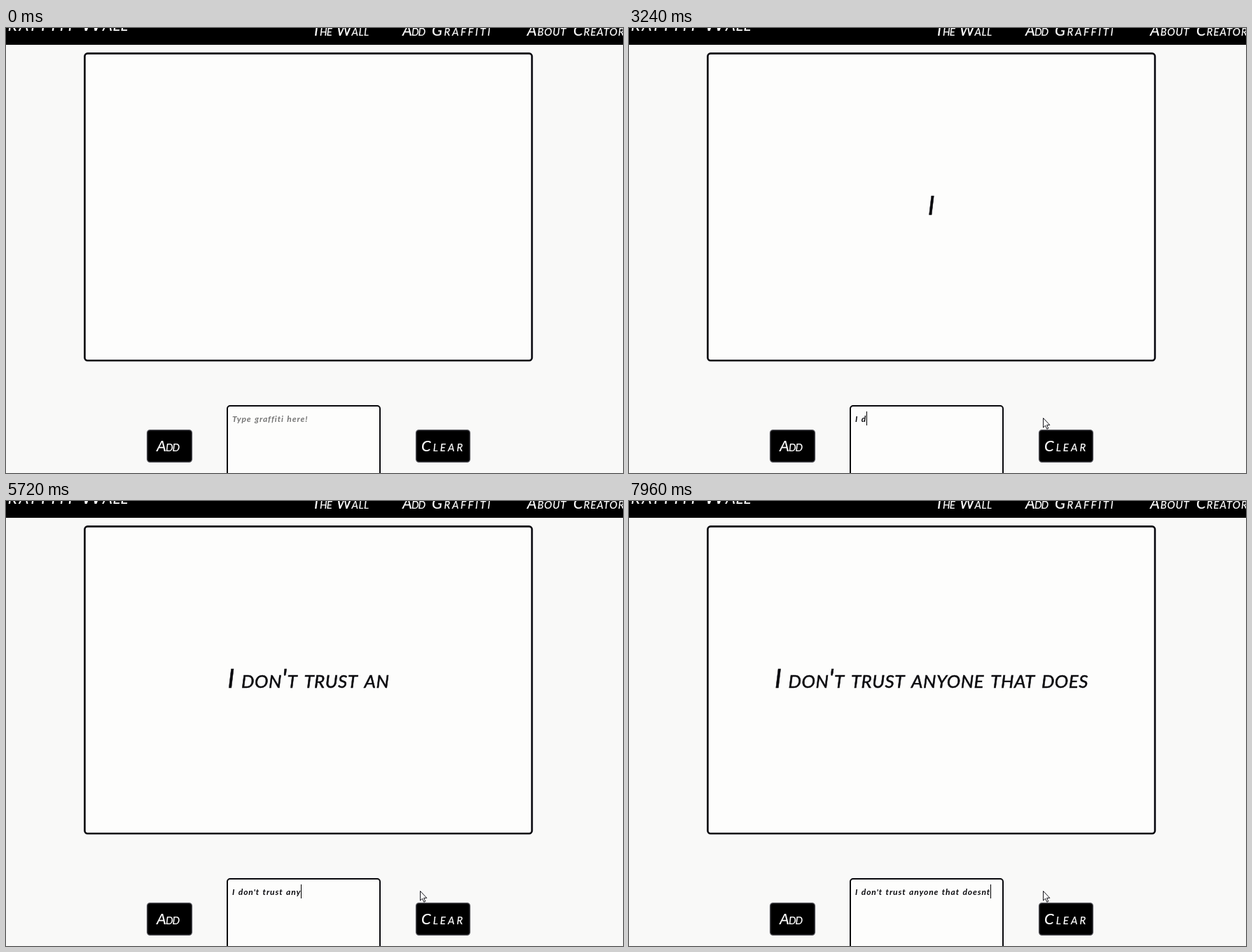
An HTML page that plays this animation: 881x636 px, repeating every 8000 ms.

```html
<!DOCTYPE html>
<html lang="en">
<head>
<meta charset="utf-8">
<title>Graffiti wall</title>
<style>
  html, body { margin: 0; width: 100%; height: 100%; overflow: hidden; background: #f9f9f8; }
  svg { display: block; }
  text { white-space: pre; font-family: Lato, "Open Sans", sans-serif; font-style: italic; }
  .caps { font-variant-caps: small-caps; font-size: 22px; fill: #fff; stroke: #fff; stroke-width: .2; }
  #wall { font-size: 37px; letter-spacing: .5px; text-anchor: middle; fill: #0a0a0e; stroke: #0a0a0e; stroke-width: .5; }
  #typed { font-size: 12px; font-weight: bold; letter-spacing: .9px; word-spacing: 1px; }
  .button { stroke: #45454b; stroke-width: 1.5; }
</style>
</head>
<body>
<svg width="881" height="636" viewBox="0 0 881 636">
  <rect width="881" height="24"/>
  <rect x="112.4" y="36.4" width="638.6" height="438.8" rx="4" fill="#fdfdfc" stroke="#05050c" stroke-width="2.6"/>
  <rect x="316" y="540" width="218" height="120" rx="4" fill="#fdfdfc" stroke="#08080c" stroke-width="2"/>
  <rect class="button" x="201.7" y="574.7" width="63.6" height="45.6" rx="4"/>
  <rect class="button" x="585.7" y="574.7" width="76.6" height="45.6" rx="4"/>
  <g id="labels"></g>
  <text id="wall" class="caps" x="432" y="267"></text>
  <text id="typed" x="323" y="563"></text>
  <rect id="caret" y="548" width="1" height="20"/>
  <g id="ring" fill="none">
    <circle r="21" stroke="#e4f3f2" stroke-width="2"/>
    <circle r="17.5" stroke="#5bd5cd" stroke-width="5"/>
    <circle r="3" fill="#b5e3f0"/>
  </g>
  <path id="arrow" d="M.5 .5v13.5l3-2.8 2.3 5 2-1-2.2-4.8h4.2z" fill="#fff" stroke="#16161c"/>
  <path id="beam" d="M-3-6.5h2.5l.5.5.5-.5H3M0-6V6M-3 6.5h2.5L0 6l.5.5H3" fill="none" stroke="#222"/>
</svg>
<script>
const LOOP = 8000, CLICK = 1200, LAG = 80;
const PHRASE = "I don't trust anyone that doesnt";
const KEYS = [2640, 2900, 3240, 3400, 3560, 3840, 4060, 4260, 4400, 4680, 4820,
  4960, 5080, 5200, 5300, 5400, 5700, 5920, 6060, 6200, 6320, 6440, 6560, 6760,
  6880, 7060, 7200, 7380, 7600, 7740, 7900, 7950];
// pointer stops: time, x, y
const STOPS = [[240, 577, 489], [640, 280, 610], [1000, 364, 564], [1200, 364, 564], [1880, 591, 557]];

const $ = id => document.getElementById(id);
const [labels, wall, typed, caret, ring, arrow, beam] =
  ["labels", "wall", "typed", "caret", "ring", "arrow", "beam"].map($);

function label(words, x, y, spacing, size = 22) {
  const el = document.createElementNS("http://www.w3.org/2000/svg", "text");
  el.textContent = words;
  el.setAttribute("class", "caps");
  el.setAttribute("x", x);
  el.setAttribute("y", y);
  el.style.fontSize = size + "px";
  el.style.letterSpacing = spacing + "px";
  labels.append(el);
}
label("Graffiti", -22, 4, 3, 32);
label("Wall", 107, 4, .5, 32);
label("The", 437, 11, -1);
label("Wall", 472, 11, .5);
label("Add", 566, 11, -1);
label("Graffiti", 608, 11, 2.6);
label("About", 744, 11, .8);
label("Creator", 810, 11, 1);
label("Add", 215, 605, -1);
label("Clear", 593, 605, 3);

const show = (el, on) => el.style.display = on ? "" : "none";
const move = (el, x, y, s = 1) => el.setAttribute("transform", `translate(${x} ${y}) scale(${s})`);
const clamp = v => Math.max(0, Math.min(1, v));
const count = t => KEYS.filter(k => k <= t).length;

function pointer(t) {
  let i = 0;
  while (i < STOPS.length - 2 && t >= STOPS[i + 1][0]) i++;
  const [t0, x0, y0] = STOPS[i], [t1, x1, y1] = STOPS[i + 1];
  const u = clamp((t - t0) / (t1 - t0)), e = u * u * (3 - 2 * u);
  return [x0 + (x1 - x0) * e, y0 + (y1 - y0) * e];
}

function draw(t) {
  const n = count(t);
  wall.textContent = PHRASE.slice(0, count(t - LAG)).trim();
  typed.textContent = n ? PHRASE.slice(0, n) : "Type graffiti here!";
  typed.setAttribute("fill", n ? "#0a0a0e" : "#757575");

  const blink = Math.floor((t - CLICK) / 500) % 2 === 0;
  show(caret, t >= CLICK && (n || blink));
  caret.setAttribute("x", Math.round(323 + (n ? typed.getComputedTextLength() : -.4)));

  const [x, y] = pointer(t);
  const inBox = x > 316 && x < 534 && y > 540;
  show(arrow, t >= 240 && !inBox);
  show(beam, t >= 240 && inBox);
  move(arrow, Math.round(x), Math.round(y));
  move(beam, Math.round(x), Math.round(y) + 3);

  show(ring, t >= CLICK && t < 1800);
  move(ring, 364, 564.5, .2 + .8 * clamp((t - CLICK) / 400));
  ring.style.opacity = clamp((1800 - t) / 160);
}

const start = performance.now();
function frame() {
  draw((performance.now() - start) % LOOP);
  requestAnimationFrame(frame);
}
frame();
</script>
</body>
</html>
```
